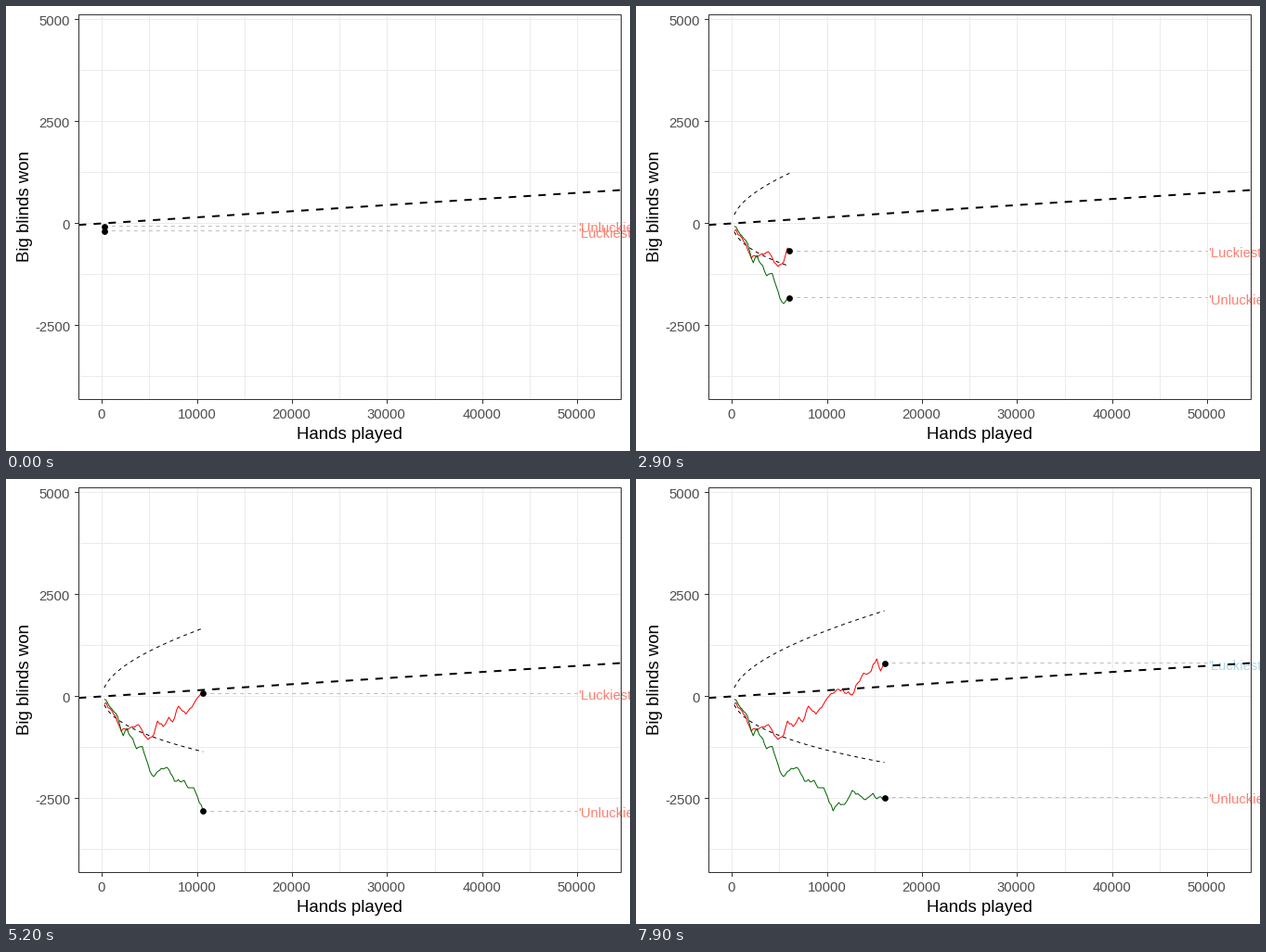
A matplotlib script for the animation above (8000 ms loop, 672 by 480 pixels).

```python
import numpy as np
import matplotlib.pyplot as plt
from matplotlib.animation import FuncAnimation
from matplotlib.patches import Rectangle

W, H, DPI = 672, 480, 96
LEFT, RIGHT, TOP, BOTTOM = 78.5, 662.5, 9.5, 424.5
FRAMES, INTERVAL, STEP = 80, 100, 200
PT = 72 / DPI  # one pixel in points
INK, GREY, GRID = "#333333", "#4D4D4D", "#EBEBEB"
DASH = (0, (4, 4))

plt.rcParams["font.family"] = "Liberation Sans"


def px(hands):
    return 103.75 + np.asarray(hands) * 0.01024


def py(blinds):
    return 234.5 - np.asarray(blinds) * 0.044


def snap(v):
    """Centre of the pixel that holds v."""
    return np.floor(v) + 0.5


def walk(turns, seed):
    """Path through the main turns, with a small wobble between them."""
    at, height = np.array(turns).T
    k = np.arange(FRAMES)
    wobble = np.random.default_rng(seed).normal(0, 1.2, FRAMES)
    wobble[at.astype(int)] = 0
    return np.interp(k, at, height) + wobble


# (step, stage height) of the main turns
lucky = walk([(0, 242.5), (4, 250), (8, 267), (12, 271), (18, 265), (23, 281),
              (26, 276), (28, 261), (31, 267), (34, 257), (36, 262),
              (39, 245), (43, 253.5), (49, 236), (54, 227), (62, 233),
              (67, 213), (71, 209), (75, 194), (77, 207), (79, 198.5)], 3)
unlucky = walk([(0, 237.5), (4, 248), (7, 256), (10, 277), (12, 269),
                (17, 291), (20, 288.5), (24, 315), (26, 321), (29, 314.5),
                (33, 311), (37, 326), (42, 325), (44, 333), (47, 333),
                (52, 358), (55, 349), (58, 351), (62, 336), (65, 339.5),
                (69, 346), (73, 339), (75, 345), (79, 343.5)], 5)

hands = STEP * np.arange(1, FRAMES + 1)
xs = px(hands)
mean = 0.015 * hands
spread = 1.96 * 75 * np.sqrt(hands / 100)  # 95 % band, 75 bb per 100 hands

fig = plt.figure(figsize=(W / DPI, H / DPI), dpi=DPI, facecolor="white")
ax = fig.add_axes([0, 0, 1, 1])
ax.set_xlim(0, W)
ax.set_ylim(H, 0)
ax.axis("off")


def line(x, y, color, z, width=1, **kw):
    return ax.plot(x, y, color=color, lw=width * PT, zorder=z, snap=False,
                   solid_capstyle="butt", dash_capstyle="butt", **kw)[0]


def text(x, y, s, size, color, **kw):
    return ax.text(x, y, s, fontsize=size, color=color, zorder=5, **kw)


# Grid, ticks and axis labels
for n in range(0, 55000, 5000):
    x = snap(px(n))
    line([x, x], [TOP, BOTTOM], GRID, 1)
    if n % 10000 == 0:
        line([x, x], [BOTTOM, BOTTOM + 4.5], INK, 7)
        text(x - 1, 445, str(n), 11.2, GREY, ha="center")
for b in range(-3750, 5001, 1250):
    y = snap(py(b))
    line([LEFT, RIGHT], [y, y], GRID, 1)
    if b % 2500 == 0:
        line([LEFT - 4.5, LEFT], [y, y], INK, 7)
        text(69, y + 6.5, str(b), 11.2, GREY, ha="right")

text((LEFT + RIGHT) / 2 - 1, 467, "Hands played", 14, "black", ha="center")
text(25, (TOP + BOTTOM) / 2 - 1, "Big blinds won", 14, "black", rotation=90,
     ha="center", va="baseline", rotation_mode="anchor")
ax.add_patch(Rectangle((LEFT, TOP), RIGHT - LEFT, BOTTOM - TOP, fill=False,
                       ec=INK, lw=PT, zorder=7, snap=False))

# Expected value over the full width
ends = np.array([-2475, 54600])
line(px(ends), py(0.015 * ends), "black", 6, width=2, ls=DASH)

bands = [(py(mean + side * spread), line([], [], "black", 3, ls=DASH))
         for side in (1, -1)]


class Player:
    def __init__(self, name, ys, color):
        self.ys = ys
        self.path = line([], [], color, 4)
        self.guide = line([], [], "#BEBEBE", 2, ls=DASH)
        self.dot = line([], [], "black", 5, marker="o", markersize=6.8 * PT,
                        markeredgewidth=0)
        self.label = text(px(50000), 0, name, 11.04, "salmon")

    def show(self, k):
        y = self.ys[k]
        ahead = y < py(mean[k])
        self.path.set_data(xs[:k + 1], self.ys[:k + 1])
        self.guide.set_data([xs[k], px(50000)], [snap(y)] * 2)
        self.dot.set_data([xs[k]], [y])
        self.label.set_y(y + 7)
        self.label.set_color("lightblue" if ahead else "salmon")


players = [Player("'Luckiest'", lucky, "red"),
           Player("'Unluckiest'", unlucky, "darkgreen")]


def draw(k):
    for ys, band in bands:
        band.set_data(xs[:k + 1], ys[:k + 1])
    for p in players:
        p.show(k)
    return []


anim = FuncAnimation(fig, draw, frames=FRAMES, init_func=lambda: draw(0),
                     interval=INTERVAL, repeat=True, repeat_delay=0)
plt.show()
```
